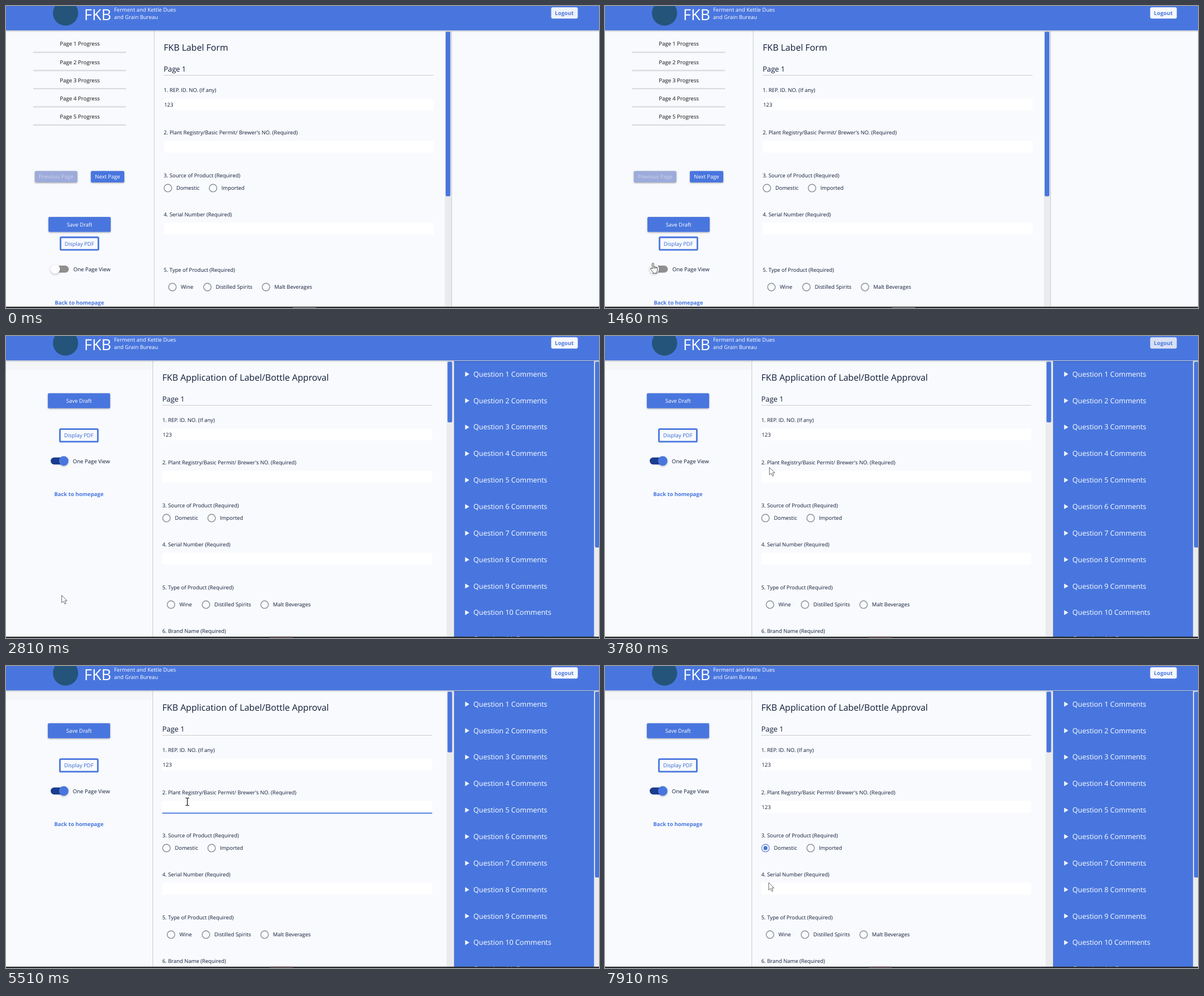
Write an HTML page that moves like this. It is 1048 px wide and 534 px high and loops after 8 s.

```html
<!DOCTYPE html>
<html lang="en">
<head>
<meta charset="utf-8">
<title>Label form</title>
<style>
  html, body { margin: 0; width: 100%; height: 100%; overflow: hidden; background: #f8fafd; }
  svg { display: block; width: 100vw; height: 100vh; }
  text { font-family: "Open Sans", "Noto Sans", sans-serif; text-rendering: geometricPrecision; white-space: pre; }
</style>
</head>
<body>
<svg id="stage" viewBox="0 0 1048 534" preserveAspectRatio="none">
  <defs>
    <filter id="soft" x="-20%" y="-40%" width="140%" height="200%">
      <feDropShadow dx="0" dy="1" stdDeviation="1.5" flood-color="#000" flood-opacity=".34"/>
    </filter>
  </defs>
</svg>
<script>
const LOOP = 8000;
const BLUE = '#4876de', INK = '#101c38', PAGE = '#f8fafd', RING = '#8c8f94';
const stage = document.getElementById('stage');

function add(parent, tag, attrs, content) {
  const el = document.createElementNS('http://www.w3.org/2000/svg', tag);
  for (const k in attrs) el.setAttribute(k, attrs[k]);
  if (content !== undefined) el.textContent = content;
  parent.appendChild(el);
  return el;
}
const group = (parent) => add(parent, 'g', {});
const rect = (g, x, y, width, height, fill, more) => add(g, 'rect', { x, y, width, height, fill, ...more });
const text = (g, x, y, str, size, fill = INK, more) =>
  add(g, 'text', { x, y, 'font-size': size, fill, ...more }, str);
const middle = (g, x, y, str, size, fill, more) =>
  text(g, x, y, str, size, fill, { 'text-anchor': 'middle', ...more });
const show = (el, on) => el.setAttribute('visibility', on ? 'visible' : 'hidden');

function button(g, x, y, w, h, label, fill = BLUE, ink = '#fff') {
  rect(g, x, y, w, h, fill, { rx: 2, filter: 'url(#soft)' });
  middle(g, x + w / 2, y + h / 2 + 3.6, label, 9.45, ink);
}

function radio(g, x, y, label) {
  const ring = add(g, 'circle', { cx: x, cy: y, r: 6.7, fill: PAGE, stroke: RING, 'stroke-width': 1.4 });
  text(g, x + 14.8, y + 3.4, label, 9.38);
  return ring;
}

function field(g, x, y, label, box) {
  text(g, x, y, label, 9.36);
  rect(g, x, box, 477, 21, '#fff');
}

// Save, PDF, view switch and home link, stacked at the given heights.
function tools(g, cx, saveY, pdfY, switchY, homeY, on) {
  button(g, cx - 55, saveY, 110, 26.5, 'Save Draft');
  rect(g, cx - 33.7, pdfY + 1.3, 67, 22.2, PAGE, { stroke: BLUE, 'stroke-width': 2.8, rx: 1.5 });
  middle(g, cx - .3, pdfY + 16, 'Display PDF', 9.45, '#3565d6');
  rect(g, cx - 50, switchY - 6.2, 31, 12.4, on ? '#1b3d8f' : '#8f8f8f', { rx: 6.2 });
  add(g, 'circle', { cx: on ? 102 : 87, cy: switchY, r: 8.4, fill: on ? BLUE : '#fcfcfd', filter: 'url(#soft)' });
  text(g, cx - 11, switchY + 3.6, 'One Page View', 9.5);
  middle(g, cx - .3, homeY, 'Back to homepage', 9.45, BLUE, { 'font-weight': 700 });
}

function form(g, x, title, typeY) {
  text(g, x, 78.5, title, 15.7);
  text(g, x, 116, 'Page 1', 12.7);
  rect(g, x, 122, 477, 1, '#c9ccd1');
  field(g, x, 151.6, '1. REP. ID. NO. (If any)', 163.5);
  text(g, x + .8, 177.8, '123', 9.4);
  field(g, x, 227.4, "2. Plant Registry/Basic Permit/ Brewer's NO. (Required)", 238.5);
  text(g, x, 303, '3. Source of Product (Required)', 9.36);
  const domestic = radio(g, x + 7.4, 321.9, 'Domestic');
  radio(g, x + 87.2, 321.9, 'Imported');
  field(g, x, 372.2, '4. Serial Number (Required)', 383.2);
  text(g, x, typeY + 3.6, '5. Type of Product (Required)', 9.36);
  radio(g, x + 15.4, typeY + 30.7, 'Wine');
  radio(g, x + 77.2, typeY + 30.7, 'Distilled Spirits');
  radio(g, x + 180.8, typeY + 30.7, 'Malt Beverages');
  return domestic;
}

rect(stage, 0, 0, 1048, 534, PAGE);

// Paged view
const paged = group(stage);
for (let i = 0; i < 5; i++) {
  middle(paged, 130.5, 70.4 + i * 32.1, `Page ${i + 1} Progress`, 9.55, '#111');
  rect(paged, 48, 80.7 + i * 32.1, 164, 2.5, '#dbdde1');
}
button(paged, 51, 291.7, 75, 20.3, 'Previous Page', '#9dabda', '#c9d2ee');
button(paged, 150, 291.7, 59, 20.3, 'Next Page');
tools(paged, 130, 373, 407.7, 465.3, 527.6, false);
rect(paged, 261.5, 43, 1, 491, '#c8cacf');
form(paged, 278.7, 'FKB Label Form', 466.3);
rect(paged, 775.5, 43, 12, 491, '#eaebed');
rect(paged, 787, 43, 1, 491, '#c8cacf');
rect(paged, 777, 45.5, 8.3, 291, BLUE, { rx: 2 });

// Single page view
const single = group(stage);
rect(single, 0, 43, 259, 17, '#f5f6f8');
tools(single, 129, 101.3, 163.4, 221, 283.4, true);
rect(single, 259, 43, 1, 491, '#c8cacf');
const domestic = form(single, 276.2, 'FKB Application of Label/Bottle Approval', 444.2);
text(single, 276.2, 524.8, '6. Brand Name (Required)', 9.36);
rect(single, 778.5, 43, 12, 491, '#eaebed');
rect(single, 780.3, 45.5, 8.2, 107.3, BLUE, { rx: 2 });
rect(single, 791, 43, 1, 491, '#c8cacf');
rect(single, 792, 43, 247.5, 491, BLUE);
for (let i = 0; i < 11; i++) {
  const y = 67.5 + i * 46.84;
  add(single, 'path', { d: `M811.5 ${y - 4.4}l7.2 4.4l-7.2 4.4z`, fill: '#fff' });
  text(single, 826, y + 4.3, `Question ${i + 1} Comments`, 12.5, '#fff');
}
rect(single, 1039.5, 43, 8.5, 491, '#eaebed');
rect(single, 1041, 45.5, 8, 328.5, BLUE, { rx: 2 });

const underline = rect(single, 276.2, 259.3, 477, 1.8, BLUE);
const typed = text(single, 277, 252.6, '', 9.4);
const caret = rect(single, 276.8, 242.5, 1, 13, '#111');
const ripple = add(single, 'circle', { cx: 283.6, cy: 321.9, r: 17, fill: BLUE });
const dot = add(single, 'circle', { cx: 283.6, cy: 321.9, r: 3.6, fill: BLUE });

// Header
rect(stage, 0, 0, 1048, 43, BLUE, { filter: 'url(#soft)' });
rect(stage, 0, 43, 1048, 1, '#c3cbdd');
add(stage, 'circle', { cx: 105.2, cy: 12.5, r: 22.3, fill: '#245479' });
text(stage, 138, 24.8, 'FKB', 27, '#fff');
text(stage, 191, 10.2, 'Ferment and Kettle Dues', 9.45, '#fff');
text(stage, 191, 23.4, 'and Grain Bureau', 9.45, '#fff');
const logout = rect(stage, 963.5, 2.2, 47, 20, '#f7f8fd', { rx: 3 });
middle(stage, 986.6, 16.2, 'Logout', 9.55, BLUE, { 'font-weight': 700 });

// Bottom edge
rect(stage, 0, 531.7, 1048, 2.3, '#26282b');
const tab = rect(stage, 507, 531.7, 41, 2.3, '#5d5f62');

// Pointers
const arrow = add(stage, 'path', {
  d: 'M0 0V13.2L3.1 10.4L5.4 15.4L7.6 14.4L5.4 9.6H9.5Z',
  fill: '#fff', stroke: '#444', 'stroke-width': .8, 'stroke-linejoin': 'round'
});
const hand = add(stage, 'path', {
  d: 'M3.4 10.6V1.6Q3.4 0 4.7 0T6 1.6V6.6Q7.2 5.6 8.2 6.8Q9.5 6 10.4 7.3Q12.6 6.8 12.6 9V12.4Q12.6 14.2 11.4 15.6V18H4.8V16L.4 11Q-.4 9.4 1 9Q2 8.8 3.4 10.6ZM6 6.6V10M8.2 6.8V10M10.4 7.3V10',
  fill: '#fff', stroke: '#333', 'stroke-width': .9, 'stroke-linejoin': 'round'
});
const beam = add(stage, 'path', {
  d: 'M-3.2 -6.5H-1L0 -5.8L1 -6.5H3.2M0 -5.8V5.8M-3.2 6.5H-1L0 5.8L1 6.5H3.2',
  fill: 'none', stroke: '#111', 'stroke-width': 1.2
});

// Pointer route: time, x, y
const route = [
  [70, 790, 473], [220, 714, 463], [450, 714, 463], [590, 439.5, 458], [750, 439.5, 458],
  [910, 201.5, 434], [1060, 201.5, 434], [1250, 140, 420], [1400, 80, 454.5], [1940, 80, 454.5],
  [2040, 97, 458.5], [2810, 98.5, 458.5], [2880, 98.5, 458.5], [3090, 186.5, 422], [3400, 186.5, 422],
  [3550, 262.5, 219.5], [3710, 262.5, 219.5], [3780, 290.5, 232.3], [4020, 320.5, 240],
  [6690, 320.5, 240], [6840, 284, 321], [7070, 284, 321], [7320, 283.5, 350],
  [7460, 283.5, 350], [7470, 284.5, 353.5], [7690, 284.5, 353.5], [7910, 289.3, 383]
];

const ramp = (t, a, b) => Math.max(0, Math.min(1, (t - a) / (b - a)));

function pointerAt(t) {
  const i = route.findIndex(p => p[0] > t);
  if (i < 0) return route[route.length - 1].slice(1);
  if (i === 0) return route[0].slice(1);
  const [t0, x0, y0] = route[i - 1], [t1, x1, y1] = route[i];
  const k = ramp(t, t0, t1);
  return [x0 + (x1 - x0) * k, y0 + (y1 - y0) * k];
}

function drawPointer(t) {
  const [x, y] = pointerAt(t);
  const isHand = t >= 1180 && t < 2000;
  const isBeam = t >= 3860 && t < 6800;
  show(arrow, t >= 70 && !isHand && !isBeam);
  show(hand, isHand);
  show(beam, isBeam);
  for (const el of [arrow, hand, beam]) el.setAttribute('transform', `translate(${x} ${y})`);
}

function draw(t) {
  const onePage = t >= 2810;
  show(paged, !onePage);
  show(single, onePage);

  const dim = .3 * (1 - ramp(t, 70, 220)) + ramp(t, 2880, 3090) * (1 - ramp(t, 4730, 4980));
  logout.setAttribute('fill', `rgb(${247 - 30 * dim},${248 - 24 * dim},${253 - 10 * dim})`);
  tab.setAttribute('x', t < 2000 ? 507 : 466);
  tab.setAttribute('fill', onePage ? '#54434a' : '#5d5f62');

  const focus = ramp(t, 4700, 4900) * (1 - ramp(t, 6760, 6900));
  underline.setAttribute('opacity', focus);
  typed.textContent = '123'.slice(0, t < 6120 ? 0 : t < 6200 ? 2 : 3);
  caret.setAttribute('x', 276.8 + typed.textContent.length * 5.4);
  const caretOn = (t >= 4800 && t < 5510) || (t >= 5970 && t < 6830);
  caret.setAttribute('opacity', caretOn ? 1 : 0);

  const picked = t >= 6830;
  dot.setAttribute('opacity', picked ? 1 : 0);
  domestic.setAttribute('stroke', picked ? '#7390d2' : RING);
  ripple.setAttribute('opacity', .12 * ramp(t, 6740, 6900) * (1 - ramp(t, 7070, 7320)));

  drawPointer(t);
}

const start = performance.now();
function tick() {
  draw((performance.now() - start) % LOOP);
  requestAnimationFrame(tick);
}
draw(0);
requestAnimationFrame(tick);
</script>
</body>
</html>
```
